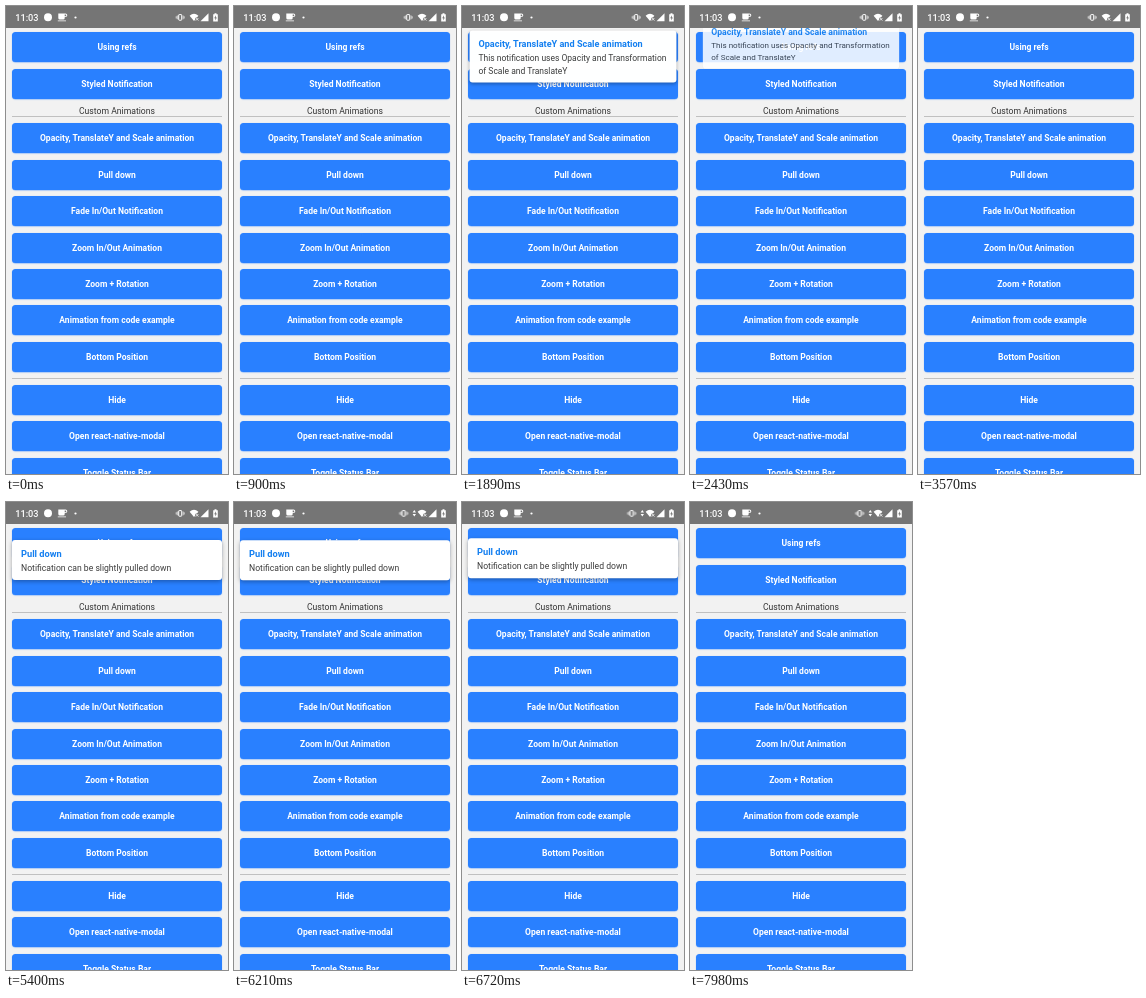
Recreate the animation shown at these times as an HTML page. Size 222 px wide and 468 px high, loop 8 s.

```html
<!DOCTYPE html>
<html lang="en">
<head>
<meta charset="utf-8">
<title>Notification demo</title>
<style>
  html, body { margin: 0; width: 100%; height: 100%; overflow: hidden; }
  body { position: relative; background: #f2f2f2; font: 8.63px Roboto, sans-serif; color: #333; }

  .status { position: absolute; top: 0; left: 0; width: 222px; height: 22px; background: #757575; }
  .app { position: absolute; top: 22px; left: 0; width: 222px; height: 446px; overflow: hidden; }

  .btn, .rule, .head { position: absolute; left: 6px; width: 210px; }
  .btn {
    height: 30.2px; line-height: 31.4px; border-radius: 3.5px;
    background: #2980ff; box-shadow: 0 .4px 1px rgba(41, 128, 255, .6);
    color: #fff; font-size: 8.55px; font-weight: 700; text-align: center;
  }
  .rule { height: 1px; background: #c0c0c0; }
  .head { top: 77px; line-height: 13px; text-align: center; }

  .card {
    position: absolute; top: 6px; left: 6px; width: 210px; box-sizing: border-box;
    padding: 8px 9px 0; border-radius: 3px; background: #fff;
    box-shadow: 0 1.5px 4px rgba(0, 0, 0, .32);
    line-height: 12.7px; white-space: nowrap; color: #3c3c3c;
  }
  .card b { display: block; margin-bottom: 2px; font-size: 9.25px; line-height: 12px; color: #147ff0; }
  .fade { height: 53px; animation: fade 8s linear infinite; }
  .pull { height: 39.7px; animation: pull 8s linear infinite; }

  @keyframes fade {
    0% { transform: translateY(-165px) scale(.5); opacity: 0; }
    9.375% { transform: translateY(-165px) scale(.5); opacity: 0; animation-timing-function: ease-out; }
    16.875%, 19.125% { transform: none; opacity: 1; }
    23.625% { transform: translateY(-4px) scale(.985); opacity: 1; box-shadow: 0 1.5px 4px rgba(0, 0, 0, .32); }
    30.375% { transform: translateY(-16.5px) scale(.935); opacity: .86; box-shadow: 0 .5px 1px rgba(0, 0, 0, .1); }
    33.75% { transform: translateY(-35px) scale(.89); opacity: .7; }
    38.25%, 100% { transform: translateY(-165px) scale(.5); opacity: 0; }
  }
  @keyframes pull {
    0% { transform: translateY(-80px); }
    50.625% { transform: translateY(-80px); animation-timing-function: ease-out; }
    56.25% { transform: none; }
    59.625% { transform: none; animation-timing-function: ease-out; }
    67.5% { transform: translateY(10px); }
    73.125%, 76.125% { transform: translateY(10.6px); }
    84% { transform: translateY(8.4px); }
    88.125% { transform: none; animation-timing-function: ease-in; }
    93.75%, 100% { transform: translateY(-80px); }
  }

  .vibrate { animation: shift 8s step-end infinite; }
  .arrows { animation: show 8s step-end infinite; }
  @keyframes shift { 0% { transform: none; } 69.375%, 100% { transform: translateX(-4.5px); } }
  @keyframes show { 0% { opacity: 0; } 69.375%, 100% { opacity: 1; } }
</style>
</head>
<body>
<div class="app">
  <div id="list"></div>
  <div class="head">Custom Animations</div>
  <div class="rule" style="top:88px"></div>
  <div class="rule" style="top:350px"></div>
  <div class="card fade"><b>Opacity, TranslateY and Scale animation</b>This notification uses Opacity and Transformation<br>of Scale and TranslateY</div>
  <div class="card pull"><b>Pull down</b>Notification can be slightly pulled down</div>
</div>

<svg class="status" viewBox="0 0 222 22" fill="#fff">
  <text x="9.2" y="14.7" font-size="9.2" font-weight="500" font-family="Roboto, sans-serif">11:03</text>
  <circle cx="42" cy="11.3" r="4"/>
  <path d="M52.3 7.5H59.5a1.6 1.6 0 0 1 0 3.6H58.7V12a1.5 1.5 0 0 1-1.5 1.5H53.8A1.5 1.5 0 0 1 52.3 12ZM58.7 8.4V10.2H59.4a.8.8 0 0 0 0-1.8ZM51.8 14.4H60V15.3H51.8Z"/>
  <circle cx="69.5" cy="11.5" r="1.1"/>
  <g class="vibrate" fill="none" stroke="#fff">
    <rect x="172.7" y="8.6" width="3" height="5.6" rx=".5"/>
    <path d="M171.3 9.5V13.3M170.2 10.3V12.5M177.1 9.5V13.3M178.2 10.3V12.5" stroke-width=".7"/>
  </g>
  <path class="arrows" d="M180.3 8 182 10.4H178.6ZM180.3 14.5 182 12.1H178.6Z"/>
  <path d="M183.6 9.7Q188 6 192.4 9.7L188 15.1Z"/>
  <path d="M189.6 11.8 192.6 14.8M192.6 11.8 189.6 14.8" stroke="#757575" stroke-width="1.8"/>
  <path d="M189.8 12 192.4 14.6M192.4 12 189.8 14.6" stroke="#fff" stroke-width=".8"/>
  <path d="M194.5 15.3 202.5 7.3V15.3Z"/>
  <path d="M207.2 8.2H208.5V7.2H210.5V8.2H211.8V15.5H207.2Z"/>
  <path d="M209.9 9.2 208.2 12.2H209.3V14.5L210.9 11.4H209.9Z" fill="#757575"/>
</svg>

<script>
  const groups = [
    [4.3, ['Using refs', 'Styled Notification']],
    [95.3, ['Opacity, TranslateY and Scale animation', 'Pull down', 'Fade In/Out Notification',
            'Zoom In/Out Animation', 'Zoom + Rotation', 'Animation from code example', 'Bottom Position']],
    [356.8, ['Hide', 'Open react-native-modal', 'Toggle Status Bar']]
  ];
  const pitch = 36.4;
  const list = document.getElementById('list');
  for (const [top, labels] of groups) {
    labels.forEach((label, i) => {
      const btn = document.createElement('div');
      btn.className = 'btn';
      btn.textContent = label;
      btn.style.top = top + i * pitch + 'px';
      list.append(btn);
    });
  }
</script>
</body>
</html>
```
